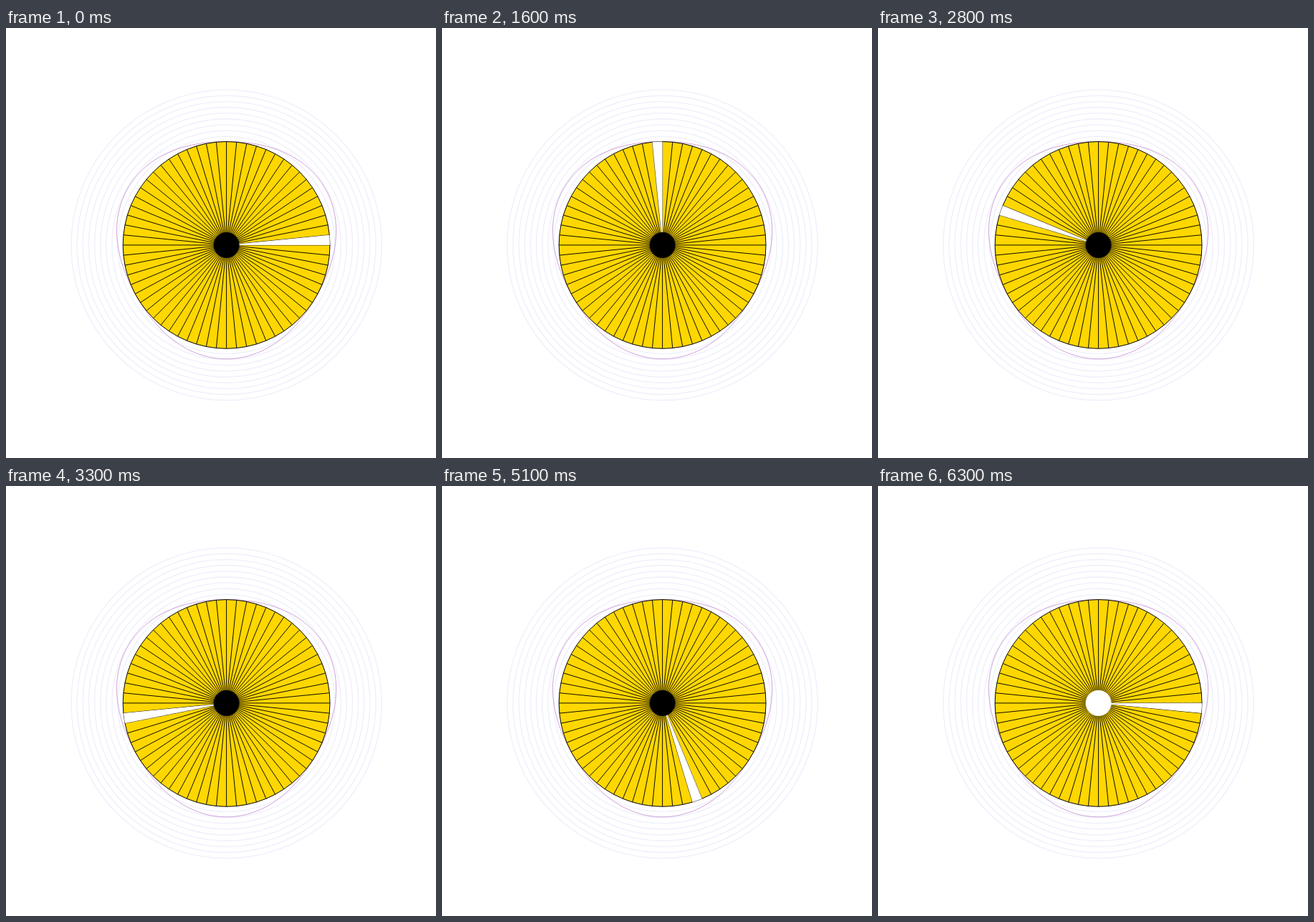
An HTML page for the animation above (6.4 s loop, 600x600 px).

```html
<!DOCTYPE html>
<html lang="en">
<head>
<meta charset="utf-8">
<title>Wheel</title>
<style>
  html, body { margin: 0; width: 100%; height: 100%; overflow: hidden; background: #fff; }
  svg { display: block; width: 600px; height: 600px; }
  #rings { fill: none; stroke: #f1f1fd; stroke-width: 1.6; }
  #wave { fill: none; stroke: #cfa2d8; stroke-width: 1; }
  #disc { fill: #ffd700; stroke: #000; stroke-width: 1; }
  #spokes { stroke: #000; stroke-width: 0.95; }
  #gap { fill: #fff; animation: turn 6.4s steps(64) infinite; }
  #hub { animation: blink 6.4s step-end infinite; }
  @keyframes turn { to { transform: rotate(-360deg); } }
  @keyframes blink { 0% { fill: #000; } 98.4375% { fill: #fff; } }
</style>
</head>
<body>
<svg viewBox="0 0 600 600">
  <g transform="translate(307.6 302.9)">
    <g id="rings"></g>
    <path id="wave"/>
    <circle id="disc" r="144.4"/>
    <path id="spokes"/>
    <path id="gap"/>
    <circle id="hub" r="18"/>
  </g>
</svg>
<script>
  const R = 144.4, SECTORS = 64, STEP = 2 * Math.PI / SECTORS;
  const $ = id => document.getElementById(id);
  const polar = (r, a) => `${(r * Math.cos(a)).toFixed(2)} ${(-r * Math.sin(a)).toFixed(2)}`;
  const range = (n, f) => Array.from({ length: n }, (_, i) => f(i));

  $('rings').innerHTML = range(9, i => `<circle r="${1.5 * R - 8.12 * i}"/>`).join('');

  // Three-lobed curve that touches the disc between its lobes
  const wave = range(360, i => {
    const a = i * Math.PI / 180;
    return polar(R * (1.05 + 0.05 * Math.sin(3 * a)), a);
  });
  $('wave').setAttribute('d', `M${wave.join('L')}Z`);

  $('spokes').setAttribute('d', range(SECTORS, i => `M0 0L${polar(R, i * STEP)}`).join(''));
  $('gap').setAttribute('d', `M0 0L${polar(R, 0)}A${R} ${R} 0 0 0 ${polar(R, STEP)}Z`);
</script>
</body>
</html>
```
